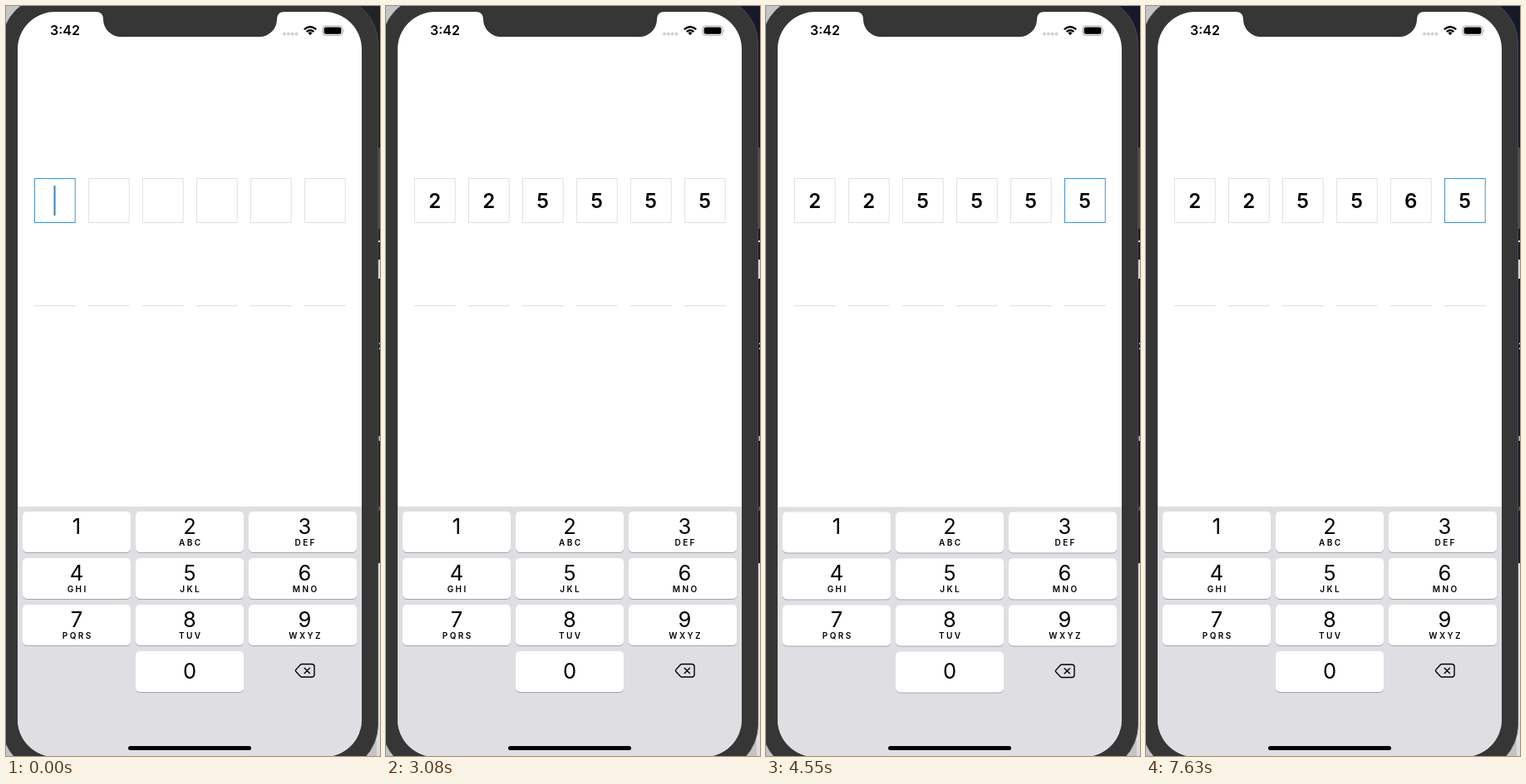
Write an HTML page that moves like this. It is 450 px wide and 902 px high and loops after 8000 ms.

```html
<!DOCTYPE html>
<html lang="en">
<head>
<meta charset="utf-8">
<title>Passcode entry</title>
<style>
  html, body { margin: 0; width: 100%; height: 100%; overflow: hidden; background: #ddd; }
  svg { display: block; width: 450px; height: 902px; }
  text { font-family: Inter, Roboto, sans-serif; text-anchor: middle; }
  .digit { font-size: 24px; font-weight: 600; }
  .num { font-size: 25.5px; }
  .abc { font-size: 10px; font-weight: 600; letter-spacing: 2.4px; }
</style>
</head>
<body>
<svg id="stage" viewBox="0 0 450 902">
  <defs>
    <clipPath id="screen"><rect x="14" y="7" width="414" height="896" rx="45"/></clipPath>
  </defs>
  <rect width="450" height="902" fill="#c4c4c4"/>
  <g id="desk"></g>
  <rect x="-5" y="-12" width="452.5" height="934" rx="58" fill="#363636" stroke="#4b4b4b"/>
  <rect x="14" y="7" width="414" height="896" rx="45" fill="#fff"/>
  <path fill="#363636" d="M108 6V7Q117 7 117 16A21 21 0 0 0 138 37H305A21 21 0 0 0 326 16Q326 7 335 7V6Z"/>
  <text x="71" y="35.3" font-size="16" font-weight="600">3:42</text>
  <g id="dots" fill="#cfcfcf"></g>
  <g fill="none" stroke="#000" stroke-width="2.3">
    <path d="M358.8 28.2Q366 21.8 373.2 28.2"/>
    <path d="M361.6 31Q366 27.2 370.4 31"/>
  </g>
  <path d="M363.4 32.3Q366 30.2 368.6 32.3L366 35.2Z"/>
  <rect x="381" y="24" width="24" height="11.4" rx="3.4" fill="none" stroke="#a5a5a5"/>
  <rect x="382.6" y="25.6" width="20.8" height="8.2" rx="2"/>
  <path fill="#a5a5a5" d="M406 28Q407.6 29.7 406 31.5Z"/>
  <g id="fields"></g>
  <g clip-path="url(#screen)">
    <g id="pad">
      <rect x="14" y="602" width="414" height="320" fill="#dfdee3"/>
    </g>
    <rect x="147" y="890" width="148" height="5" rx="2.5"/>
  </g>
</svg>
<script>
const LOOP = 8000, STEP = 70, DROP = 301;

// Passcode value from each time on
const values = [
  [0, ''], [840, '2'], [1050, '22'], [1260, '225'], [1400, '2255'], [1540, '22555'],
  [1820, '225555'], [5040, '22555'], [5180, '2255'], [6580, '22556'], [7630, '225565']
];
// Held keys: from, to, key
const presses = [
  [770, 840, '2'], [980, 1120, '2'], [1190, 1260, '5'], [1330, 1400, '5'],
  [1750, 1820, '5'], [5040, 5320, 'del'], [6510, 6650, '6'], [7560, 7630, '5']
];
// Caret opacity over time
const caretFades = [
  [0, 1], [280, 1], [490, 0], [839, 0], [840, 1], [5390, 1], [5670, 0],
  [5880, 0], [6160, 1], [6790, 1], [7070, 0], [7280, 0], [7560, 1], [LOOP, 1]
];

const byId = id => document.getElementById(id);

function add(parent, tag, attrs, text = '') {
  const el = document.createElementNS('http://www.w3.org/2000/svg', tag);
  for (const name in attrs) el.setAttribute(name, attrs[name]);
  el.textContent = text;
  parent.append(el);
  return el;
}

// Sliver of the desktop to the right of the phone
const desk = byId('desk');
const strip = (y, h, fill, x = 446) => add(desk, 'rect', { x, y, width: 450 - x, height: h, fill });
const darkStrips = [strip(0, 168, '', 425), strip(268, 37, ''), strip(328, 342, '')];
strip(168, 2, '#161616');
strip(170, 98, '#4b4b4b');
strip(282, 2, '#ddd', 448);
strip(305, 23, '#d4d4d4');
strip(405, 2, '#ccc', 449);
strip(411, 2, '#ccc', 449);
strip(517, 6, '#bbb', 448.5);
strip(602, 5, '#a83f48', 448.5);
strip(670, 232, '#dedede');

for (let i = 0; i < 4; i++) add(byId('dots'), 'circle', { cx: 335 + i * 4.8, cy: 33.5, r: 1.9 });

const fields = Array.from({ length: 6 }, (_, i) => {
  const x = 34 + i * 65, g = byId('fields');
  add(g, 'rect', { x, y: 360, width: 49.5, height: 1, fill: '#dedede' });
  return {
    box: add(g, 'rect', { x: x + .5, y: 207.5, width: 48.7, height: 53, fill: '#fff' }),
    digit: add(g, 'text', { x: x + 24.7, y: 243, class: 'digit' }),
    caret: add(g, 'rect', { x: x + 23.5, y: 216, width: 2, height: 36, fill: '#427fb6' })
  };
});

const pad = byId('pad'), keys = {};
const letters = ['', 'ABC', 'DEF', 'GHI', 'JKL', 'MNO', 'PQRS', 'TUV', 'WXYZ'];

function addKey(label, col, row, abc) {
  const x = 20 + col * 136, y = 608 + row * 56, cx = [85, 221, 359.5][col];
  const shape = { x, width: 130, height: 49, rx: 5 };
  add(pad, 'rect', { ...shape, y: y + 1, fill: '#a5a5aa' });
  keys[label] = add(pad, 'rect', { ...shape, y });
  add(pad, 'text', { x: cx, y: y + (label === '0' ? 32.5 : 26.5), class: 'num' }, label);
  add(pad, 'text', { x: cx + 1.2, y: y + 41, class: 'abc' }, abc);
}
letters.forEach((abc, i) => addKey(String(i + 1), i % 3, Math.floor(i / 3), abc));
addKey('0', 1, 3, '');

const line = { stroke: '#000', 'stroke-width': 1.4, 'stroke-linejoin': 'round', 'stroke-linecap': 'round' };
const delShape = add(pad, 'path', {
  ...line, d: 'M356 791.5H368Q371 791.5 371 794.5V804Q371 807 368 807H356Q355 807 354 806L348.7 800.2Q348 799.3 348.7 798.4L354 792.5Q355 791.5 356 791.5Z'
});
const delCross = add(pad, 'path', { ...line, d: 'M359.2 796.2L365.4 802.4M365.4 796.2L359.2 802.4' });

function lerpTable(table, t) {
  const i = table.findIndex(p => p[0] > t);
  const [t0, a] = table[i - 1], [t1, b] = table[i];
  return a + (b - a) * (t - t0) / (t1 - t0);
}

// Share of the way left for a critically damped spring
const springRest = u => (1 + u) * Math.exp(-u);

function padOffset(t) {
  if (t < 3143) return 0;
  if (t < 4079) return DROP * (1 - springRest((t - 3143) * .0171));
  return DROP * springRest((t - 4079) * .0186);
}

function render(t) {
  const value = values.findLast(v => v[0] <= t)[1];
  const focused = t < 3080 || t >= 4130;
  const active = focused ? Math.min(value.length, 5) : -1;
  const held = presses.find(([from, to]) => t >= from && t < to)?.[2];

  fields.forEach(({ box, digit, caret }, i) => {
    box.setAttribute('stroke', i === active ? '#4c8fc5' : '#e1e1e1');
    digit.textContent = value[i] || '';
    caret.setAttribute('opacity', i === active && !value[i] ? lerpTable(caretFades, t) : 0);
  });
  for (const label in keys) keys[label].setAttribute('fill', label === held ? '#ccd3df' : '#fff');
  delShape.setAttribute('fill', held === 'del' ? '#000' : 'none');
  delCross.setAttribute('stroke', held === 'del' ? '#dfdee3' : '#000');
  pad.setAttribute('transform', `translate(0 ${padOffset(t)})`);
  darkStrips.forEach(s => s.setAttribute('fill', t < 770 ? '#222326' : '#17182a'));
}

const start = performance.now();
function tick() {
  // A small lead makes up for display delay
  const t = (performance.now() - start + 16) % LOOP;
  render(Math.floor(t / STEP) * STEP);
  requestAnimationFrame(tick);
}
tick();
</script>
</body>
</html>
```
